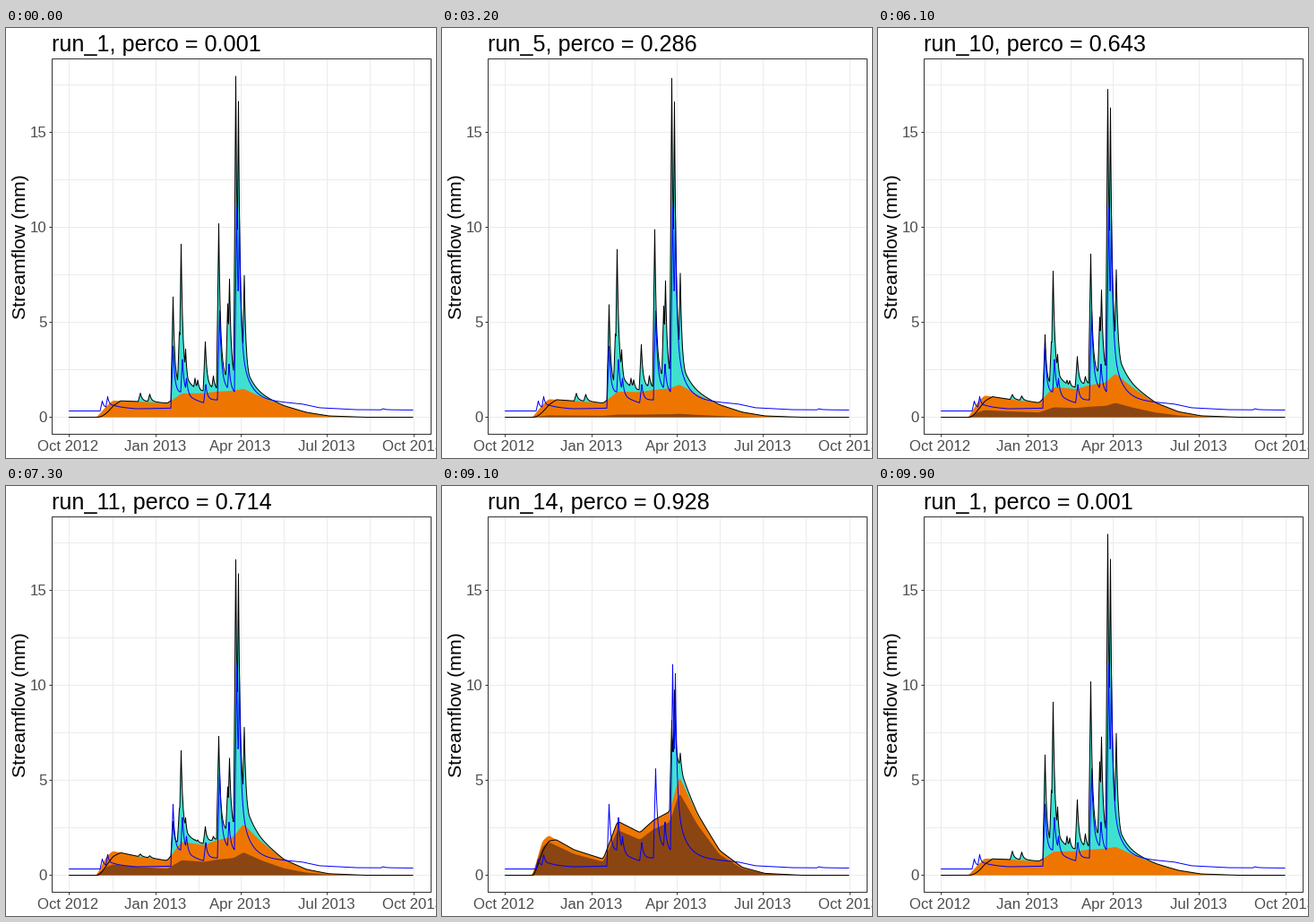
Animation of 480 by 480 pixels, one loop 10 s. Source, as a matplotlib script:

```python
import numpy as np
import matplotlib.pyplot as plt
from matplotlib.animation import FuncAnimation
from matplotlib.patches import Rectangle

SIZE, DPI = 480, 80
PT = 72 / DPI
LEFT, RIGHT, TOP, BOTTOM = 51, 474, 34, 453
ZERO, PER_MM = 434.5, 21.18
GRID, AXIS, TICK_TEXT = "#EBEBEB", "#333333", "#4D4D4D"

RUNS = 15
STARTS = [4, 11, 18, 25, 32, 39, 46, 52, 59, 66, 73, 79, 85, 91, 97]
PERCO = np.linspace(0.001, 0.999, RUNS)
X = np.arange(70, 454.6, 0.5)

# Storms: x, peak above the slow flow in mm, loss to percolation.
STORMS = [
    (150, .45, .08), (160.5, .43, .08), (186.5, 5.4, .98), (193.5, 3.3, .37),
    (195.5, 7.9, .8), (200.5, 2.35, .28), (211, .8, .17), (214, .7, .13),
    (222.5, 2.7, .46), (231.5, .85, .15), (237.5, 8.85, .89),
    (247.5, 4.6, .5), (249.5, 5.9, .45), (256.5, 16.55, .55),
    (259.5, 15.2, .44), (266, 6, .22)]
OBSERVED_STORMS = [
    (107.5, .5), (113.5, .65), (186.5, 3.2), (197, 2.15), (201.5, 1.2),
    (223, 1), (238.5, 4.75), (249, 1.85), (257.5, 10.1), (260.5, 9.65),
    (421, .06)]
# Slow flow: x, mm without percolation, mm with strong percolation.
SLOW = [
    (101, 0, 0), (112, .57, 1.8), (119, .88, 2.1), (147, .83, 1.35),
    (180, .73, .85), (196, 1.25, 2.85), (221, 1.27, 2.25), (236, 1.35, 2.9),
    (254, 1.4, 3.35), (265, 1.5, 5.2), (285, 1.07, 3.2), (310, .6, 1.3),
    (335, .26, .42), (360, .07, .1), (400, 0, 0)]
OBSERVED_BASE = [
    (106, .33), (120, .52), (145, .44), (185, .48), (195, .9), (221, .7),
    (255, 1), (290, .85), (330, .7), (350, .5), (390, .4), (454, .38)]


def y_pos(flow):
    return ZERO - PER_MM * np.asarray(flow)


def pulse(x, slow_share):
    """Unit flood wave: short rise, then fast and slow recession."""
    t = X - x
    after = np.maximum(t, 0)
    fall = ((1 - slow_share) * np.exp(-after / 1.8)
            + slow_share * np.exp(-after / 10))
    return np.where(t < 0, np.clip(1 + t / 2.5, 0, 1), fall)


def flood(peaks, slow_share):
    return np.max([h * pulse(x, slow_share) for x, h in peaks], axis=0)


def smooth(y):
    window = np.hanning(15)
    return np.convolve(y, window / window.sum(), mode="same")


def simulate(perco):
    """Total flow, slow flow and its groundwater part for one run."""
    strength = min(perco / (1.08 - perco), 8)
    xs, weak, strong = np.array(SLOW).T
    slow = smooth(np.interp(X, xs, weak + (strong - weak) * strength / 6.73))
    loss = strength * (1 + strength / 3)
    quick = flood([(x, max(h - c * loss, 0)) for x, h, c in STORMS], .18)
    routing = np.clip((X - 102) / 26, 0, 1) ** (1 / (1 + strength / 4))
    ground = slow * (1 - np.exp(-strength / 3.7))
    return np.array([slow * routing + quick, slow, ground])


FLOWS = [simulate(p) for p in PERCO]
OBSERVED = (np.interp(X, *np.array(OBSERVED_BASE).T)
            + flood(OBSERVED_STORMS, .3))

fig = plt.figure(figsize=(SIZE / DPI, SIZE / DPI), dpi=DPI, facecolor="white")
ax = fig.add_axes([0, 0, 1, 1])
ax.set(xlim=(0, SIZE), ylim=(SIZE, 0))
ax.axis("off")


def line(xs, ys, color, z):
    return ax.plot(xs, ys, color=color, lw=PT, zorder=z,
                   solid_capstyle="butt", solid_joinstyle="round")[0]


def label(x, y, text, px, color="black", **kw):
    return ax.text(x, y, text, fontsize=px * PT, color=color, va="baseline",
                   family="Liberation Sans", **kw)


def area(color, z):
    return ax.fill([0, 0, 0], [0, 0, 0], color=color, lw=0, zorder=z)[0]


for x in (70, 119, 167, 215, 262, 310, 358, 406, 455):
    line([x, x], [TOP, BOTTOM], GRID, 1)
for flow in np.arange(0, 18, 2.5):
    line([LEFT, RIGHT], [y_pos(flow) - .5] * 2, GRID, 1)
for x, text in ((70, "Oct 2012"), (167, "Jan 2013"), (262, "Apr 2013"),
                (358, "Jul 2013"), (455, "Oct 2013")):
    line([x, x], [BOTTOM, BOTTOM + 3], AXIS, 8)
    label(x - .5, 472, text, 16.8, TICK_TEXT, ha="center")
for flow in (0, 5, 10, 15):
    line([LEFT - 3, LEFT], [y_pos(flow) - .5] * 2, AXIS, 8)
    label(46, y_pos(flow) + 5.5, str(flow), 16.8, TICK_TEXT, ha="right")
ax.add_patch(Rectangle((LEFT, TOP), RIGHT - LEFT, BOTTOM - TOP, fill=False,
                       ec=AXIS, lw=PT, zorder=9))
label(22, 244, "Streamflow (mm)", 21.3, ha="center", rotation=90,
      rotation_mode="anchor")
title = label(51, 26, "", 25.3)

layers = [area("#40E0D0", 2), area("#EE7600", 3), area("#8B4513", 4)]
simulated = line(X, X, "black", 5)
line(X, y_pos(OBSERVED), "blue", 6)


def run_and_mix(frame):
    """Current run index and the share of the next run blended in."""
    done = sum(frame >= start + 2 for start in STARTS)
    step = frame - STARTS[done] + 1 if done < RUNS else 0
    return done % RUNS, max(step, 0) / 3


def update(frame):
    run, mix = run_and_mix(frame)
    after = (run + 1) % RUNS
    curves = y_pos(FLOWS[run] * (1 - mix) + FLOWS[after] * mix)
    for patch, curve in zip(layers, curves):
        patch.set_xy(np.column_stack([np.r_[X, X[-1], X[0]],
                                      np.r_[curve, ZERO, ZERO]]))
    simulated.set_ydata(curves[0])
    shown = after if mix > .5 else run
    title.set_text(f"run_{shown + 1}, perco = {PERCO[shown]:.3f}")
    return [title, simulated, *layers]


anim = FuncAnimation(fig, update, frames=100, interval=100, repeat=True,
                     repeat_delay=0, blit=False)
plt.show()
```
